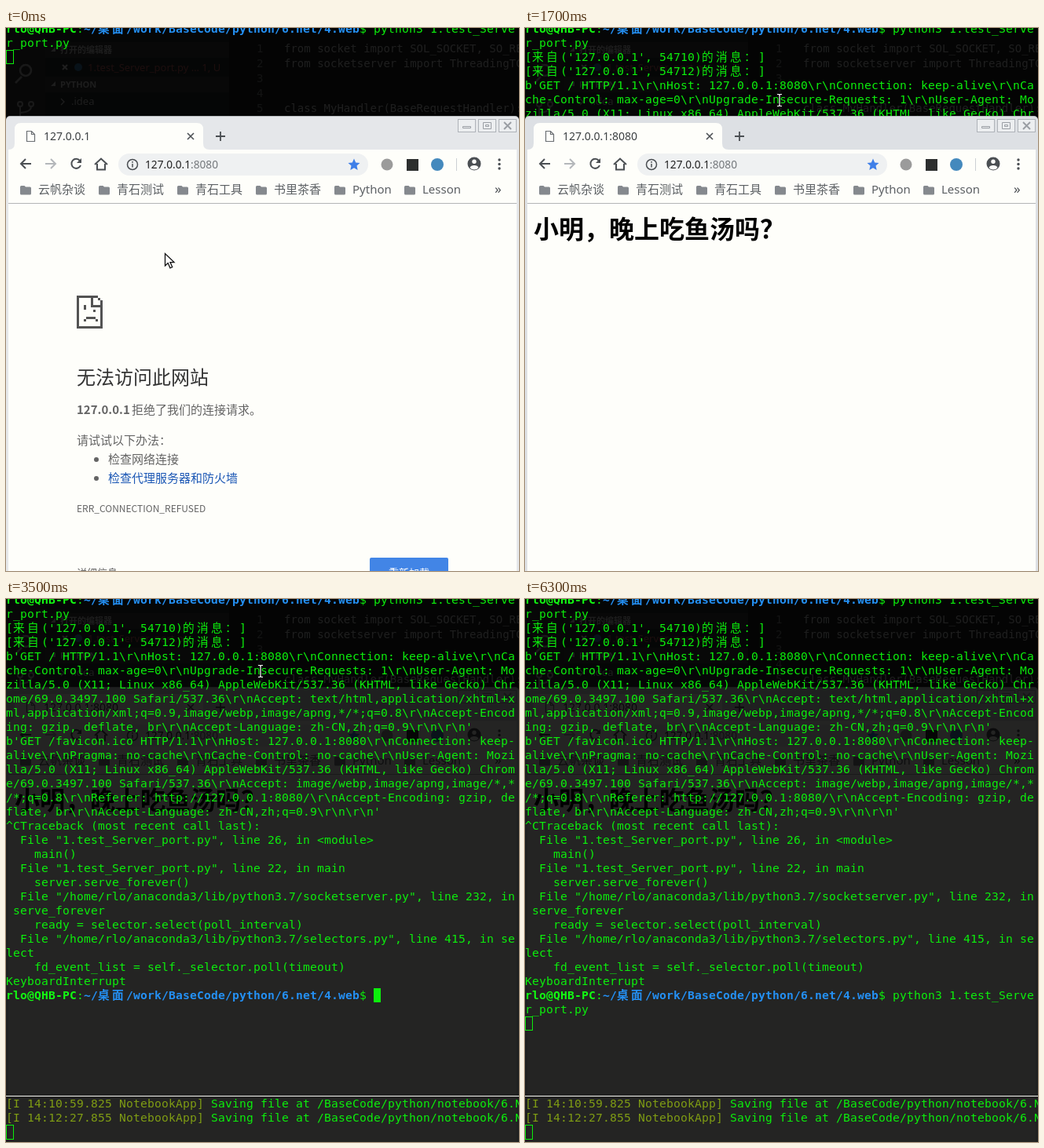
An HTML page with a canvas that plays this animation: 653x692 px, repeating every 6.4 s.

```html
<!DOCTYPE html>
<html lang="zh-CN">
<head>
<meta charset="utf-8">
<title>Socket server demo</title>
<style>
html, body { margin: 0; width: 653px; height: 692px; overflow: hidden; background: #000; }
canvas { display: block; }
</style>
</head>
<body>
<canvas id="stage" width="653" height="692"></canvas>
<script>
const ctx = document.getElementById('stage').getContext('2d');
const MONO = '"DejaVu Sans Mono", "Noto Sans CJK SC", monospace';
const UI = '"Noto Sans", "Noto Sans CJK SC", sans-serif';
const CJK = '"Noto Sans CJK SC", sans-serif';
const GREEN = '#0cee0c', BRIGHT = '#12fb12', BLUE = '#2490f4', OLIVE = '#7f9c14';
const ICON = '#4b4f53', PAPER = '#fefefa';

function rect(x, y, w, h, color) {
  ctx.fillStyle = color;
  ctx.fillRect(x, y, w, h);
}
function round(x, y, w, h, r, color) {
  ctx.fillStyle = color;
  ctx.beginPath();
  ctx.roundRect(x, y, w, h, r);
  ctx.fill();
}
function frame(x, y, w, h, color) {
  ctx.strokeStyle = color;
  ctx.lineWidth = 1;
  ctx.strokeRect(x + .5, y + .5, w - 1, h - 1);
}
function disc(x, y, r, color) {
  ctx.fillStyle = color;
  ctx.beginPath();
  ctx.arc(x, y, r, 0, 7);
  ctx.fill();
}
function path(d, color, width, x = 0, y = 0, fill) {
  const p = new Path2D(d);
  ctx.save();
  ctx.translate(x, y);
  if (fill) { ctx.fillStyle = fill; ctx.fill(p); }
  ctx.strokeStyle = color;
  ctx.lineWidth = width;
  if (width) ctx.stroke(p);
  ctx.restore();
}
function text(s, x, y, font, color) {
  ctx.font = font;
  ctx.fillStyle = color;
  ctx.fillText(s, x, y);
}

// ---- editor behind the terminal ----
function drawEditor() {
  rect(0, 0, 653, 692, '#1b1f1e');
  rect(0, 0, 50, 692, '#333333');
  rect(50, 0, 234, 692, '#252b28');
  rect(50, 18, 234, 20, '#383838');
  rect(50, 62, 234, 20, '#383838');
  path('M20 62L12 70 M32 54a7 7 0 1 1-14 0a7 7 0 1 1 14 0', '#b5b5b5', 2.5);
  path('M21 97a3 3 0 1 1-6 0a3 3 0 1 1 6 0 M35 97a3 3 0 1 1-6 0a3 3 0 1 1 6 0 M18 100v12 M32 100q0 7-14 8', '#b5b5b5', 2);
  path('M57 30h6v-6z M57 74h6v-6z', '', 0, 0, 0, '#ccc');
  path('M70 90l4 4-4 4', '#ccc', 1.3);
  path('M72 47l6 6m0-6l-6 6', '#ddd', 2);
  disc(92, 50, 5, '#3c7eb0');
  text('打开的编辑器', 69, 32, 'bold 11px ' + CJK, '#ccc');
  text('1.test_Server_port.py … 1, U', 104, 55, '13px ' + UI, '#c65f5f');
  text('PYTHON', 69, 76, 'bold 11px ' + UI, '#ccc');
  text('.idea', 83, 98, '13px ' + UI, '#ccc');
  ['from socket import SOL_SOCKET, SO_REUSEADDR', 'from socketserver import ThreadingTCPServer',
    '', '', 'class MyHandler(BaseRequestHandler):'].forEach((line, i) => {
    text(i + 1, 319, 31 + i * 19, '14px ' + MONO, '#858585');
    text(line, 354, 31 + i * 19, '14px ' + MONO, '#d4d4d4');
  });
}

// ---- terminal ----
const USER = 'rlo';
const COMMAND = 'python3 1.test_Server_port.py';
const PROMPT = [[USER + '@QHB-PC', BRIGHT, 1], [':', GREEN], ['~/桌面/work/BaseCode/python/6.net/4.web', BLUE, 1], ['$ ', GREEN]];
const AGENT = 'User-Agent: Mozilla/5.0 (X11; Linux x86_64) AppleWebKit/537.36 (KHTML, like Gecko) Chrome/69.0.3497.100 Safari/537.36';
const REQUESTS = String.raw`[来自('127.0.0.1', 54710)的消息：]
[来自('127.0.0.1', 54712)的消息：]
b'GET / HTTP/1.1\r\nHost: 127.0.0.1:8080\r\nConnection: keep-alive\r\nCache-Control: max-age=0\r\nUpgrade-Insecure-Requests: 1\r\n${AGENT}\r\nAccept: text/html,application/xhtml+xml,application/xml;q=0.9,image/webp,image/apng,*/*;q=0.8\r\nAccept-Encoding: gzip, deflate, br\r\nAccept-Language: zh-CN,zh;q=0.9\r\n\r\n'
b'GET /favicon.ico HTTP/1.1\r\nHost: 127.0.0.1:8080\r\nConnection: keep-alive\r\nPragma: no-cache\r\nCache-Control: no-cache\r\n${AGENT}\r\nAccept: image/webp,image/apng,image/*,*/*;q=0.8\r\nReferer: http://127.0.0.1:8080/\r\nAccept-Encoding: gzip, deflate, br\r\nAccept-Language: zh-CN,zh;q=0.9\r\n\r\n'
`;
const TRACEBACK = `^CTraceback (most recent call last):
  File "1.test_Server_port.py", line 26, in <module>
    main()
  File "1.test_Server_port.py", line 22, in main
    server.serve_forever()
  File "/home/${USER}/anaconda3/lib/python3.7/socketserver.py", line 232, in serve_forever
    ready = selector.select(poll_interval)
  File "/home/${USER}/anaconda3/lib/python3.7/selectors.py", line 415, in select
    fd_event_list = self._selector.poll(timeout)
KeyboardInterrupt
`;

// Writes spans on a 9 x 18 cell grid and returns where the caret ends up.
function write(spans, top, columns) {
  let col = 0, row = 0;
  for (const [s, color, bold] of spans) {
    ctx.font = (bold ? 'bold ' : '') + '11pt ' + MONO;
    ctx.fillStyle = color;
    for (const ch of s) {
      const cells = ch > '\u2e80' ? 2 : 1;
      if (ch === '\n' || col + cells > columns) { col = 0; row++; }
      if (ch === '\n') continue;
      ctx.fillText(ch, col * 9, top + row * 18 + 14);
      col += cells;
    }
  }
  return [col * 9, top + row * 18];
}

const within = (t, a, b) => t >= a && t < b;

function drawTerminal(t) {
  rect(0, 0, 653, 692, 'rgba(0,0,0,.86)');
  const spans = [...PROMPT, [COMMAND + '\n', GREEN]];
  if (t >= 900) spans.push([REQUESTS, GREEN]);
  if (t >= 2700) spans.push([TRACEBACK, GREEN], ...PROMPT);
  if (t >= 4000) spans.push([COMMAND + (t < 4600 ? ' ' : '\n'), GREEN]);
  const [x, y] = write(spans, -8, 72);
  const blinkedOff = within(t, 3300, 3500) || within(t, 4500, 4600) || within(t, 5200, 5800);
  if (t < 1900 || t >= 5800) frame(x, y, 10, 18, GREEN);
  else if (!blinkedOff) rect(x, y, 9, 18, GREEN);

  rect(0, 633, 653, 1, '#f4f4f0');
  const save = ' Saving file at /BaseCode/python/notebook/6.N\n';
  const [px, py] = write([['[I 14:10:59.825 NotebookApp]', OLIVE], [save, GREEN],
    ['[I 14:12:27.855 NotebookApp]', OLIVE], [save, GREEN]], 634, 80);
  frame(px, py, 10, 19, GREEN);
}

// ---- browser ----
function drawBrowser(t) {
  const loaded = t >= 1000, loading = within(t, 900, 1200);
  const bar = t < 300 ? '#e5e7ea' : '#dde0e4';
  round(0, 112, 653, 590, [5, 5, 0, 0], '#b9bcc0');
  round(0, 113, 653, 590, [5, 5, 0, 0], bar);
  rect(3, 155, 647, 537, PAPER);
  path('M3 155q8 0 8-8v-18q0-8 8-8h224q8 0 8 8v18q0 8 8 8z', '', 0, 0, 0, PAPER);

  if (loading) {
    ctx.strokeStyle = '#4285e6';
    ctx.lineWidth = 2;
    ctx.beginPath();
    ctx.arc(31, 138, 5, t / 120, t / 120 + 4);
    ctx.stroke();
  } else path('M26.5 131.5h6l4 4v9h-10z M32.5 131.5v4h4', '#6b6f73', 1.2);
  text(t < 900 ? '127.0.0.1' : '127.0.0.1:8080', 48, 143, '14px ' + UI, '#3c4043');
  path('M231 134l8 8m0-8l-8 8', ICON, 1.6);
  path('M267 138h12m-6-6v12', ICON, 1.8);

  [575, 601, 627].forEach(x => {
    rect(x, 116, 23, 17, '#eceef0');
    frame(x, 116, 23, 17, '#aeb2b8');
  });
  path('M581.5 125.5h10v2h-10z M607.5 120.5h10v8h-10z M610.5 123.5h4v2h-4z', '#9a9ea4', 1);
  path('M634 120l9 9m0-9l-9 9', '#9a9ea4', 2);

  // toolbar
  if (within(t, 800, 1200)) disc(89, 173, 14, '#eceef0');
  path('M32 173H19m6-6l-6 6 6 6', ICON, 2);
  path('M50 173h13m-6-6l6 6-6 6', '#b4b7ba', 2);
  if (loading) path('M84 168l10 10m0-10l-10 10', ICON, 2);
  else {
    path('M94 169a6 6 0 1 0 1 6', ICON, 2);
    path('M96 166v6h-6z', '', 0, 0, 0, ICON);
  }
  path('M113 174l8-7.5 8 7.5 M116 173v7.5h10V173', ICON, 2);
  round(143, 160, 318, 28, 14, '#eff1f2');
  path('M167.5 174a6.5 6.5 0 1 1-13 0a6.5 6.5 0 1 1 13 0 M161 173v4.5 M161 170v1.7', ICON, 1.5);
  text('127.0.0.1', 177, 179, '13.7px ' + UI, '#222');
  const hostWidth = ctx.measureText('127.0.0.1').width;
  text(':8080', 177 + hostWidth, 179, '13.7px ' + UI, '#74787c');
  path('M443 166.5l2.2 5 5.3.5-4 3.6 1.2 5.4-4.7-2.8-4.7 2.8 1.2-5.4-4-3.6 5.3-.5z', '', 0, 0, 0, '#3f7fe8');
  disc(485, 174, 7.5, '#9b9b9b');
  rect(510, 167, 15, 15, '#2c2e2e');
  disc(549, 174, 8, '#4489bd');
  rect(573, 166, 1, 16, '#ccd0d4');
  disc(596, 173, 8.5, ICON);
  disc(596, 170.3, 2.7, PAPER);
  path('M590.5 178q1-3 5.5-3t5.5 3q-2 2.5-5.5 2.5t-5.5-2.5z', '', 0, 0, 0, PAPER);
  [168, 173.5, 179].forEach(y => disc(628, y, 1.7, ICON));

  // bookmarks
  if (within(t, 500, 800)) round(111, 192, 96, 28, 14, '#f2f4f6');
  ['云帆杂谈', '青石测试', '青石工具', '书里茶香', 'Python', 'Lesson'].forEach((name, i) => {
    const x = i < 5 ? 18 + i * 100 : 507;
    path('M1.5 0h4l1.5 1.5h5.5q1.5 0 1.5 1.5v7q0 1.5-1.5 1.5h-11q-1.5 0-1.5-1.5v-8.5q0-1.5 1.5-1.5z', '', 0, x, 201, '#85898e');
    text(name, x + 23, 211, '15px ' + UI, '#5c6064');
  });
  text('»', 622, 211, '17px ' + UI, '#4b4f53');
  rect(3, 223, 647, 1, '#b4b5b6');

  if (loaded) text('小明，晚上吃鱼汤吗？', 11, 268, 'bold 32px ' + CJK, '#000');
  else drawErrorPage();
}

function drawErrorPage() {
  const GREY = '#646464';
  [[0, 0, 9, 1], [0, 0, 1, 14], [0, 13, 11, 1], [10, 2, 1, 12], [9, 1, 1, 1], [6, 0, 1, 4], [6, 4, 5, 1],
    [3, 4, 1, 2], [7, 6, 1, 1], [4, 9, 4, 1], [3, 10, 1, 1], [8, 10, 1, 1]]
    .forEach(([x, y, w, h]) => rect(90 + x * 3, 341 + y * 3, w * 3, h * 3, '#535353'));
  text('无法访问此网站', 90, 454, '24px ' + CJK, '#333');
  text('127.0.0.1', 90, 492, 'bold 15px ' + CJK, GREY);
  text('拒绝了我们的连接请求。', 160, 492, '15px ' + CJK, GREY);
  text('请试试以下办法：', 90, 531, '15px ' + CJK, GREY);
  disc(115, 550, 3, GREY);
  disc(115, 574, 3, GREY);
  text('检查网络连接', 130, 555, '15px ' + CJK, GREY);
  text('检查代理服务器和防火墙', 130, 579, '15px ' + CJK, '#1b57b5');
  text('ERR_CONNECTION_REFUSED', 90, 617, '12px ' + CJK, GREY);
  text('详细信息', 90, 699, '13px ' + CJK, GREY);
  round(463, 675, 100, 32, 2, '#4285e6');
  text('重新加载', 487, 699, '13px ' + CJK, '#fff');
}

// ---- mouse: [time, x, y], held until the next step ----
const MOUSE = [[0, 202, 287], [100, 171, 276], [500, 140, 213], [600, 118, 194], [700, 103, 175],
  [800, 93, 171], [1000, 88, 169], [1200, 96, 166], [1300, 140, 150], [1400, 205, 125],
  [1500, 270, 104], [1600, 310, 95], [1700, 324, 92], [5400, 0, -50], [5800, 126, -11], [6000, 0, -50]];

function drawMouse(t) {
  const [, x, y] = MOUSE.findLast(step => step[0] <= t);
  if (within(t, 1500, 5400)) {
    const beam = 'M-3 -7.5h2l1 1 1-1h2 M0 -6.5v13 M-3 7.5h2l1-1 1 1h2';
    path(beam, '#000', 2.4, x, y);
    path(beam, '#fff', 1.2, x, y);
  } else path('M.5 .5v15.5l3.7-3.4 2.7 6.2 2.8-1.2-2.7-6h5z', '#111', 1.3, x, y, '#fff');
}

function draw(now) {
  const t = Math.floor(now % 6400 / 100) * 100;
  drawEditor();
  if (t < 1900) { drawTerminal(t); drawBrowser(t); }
  else { drawBrowser(t); drawTerminal(t); }
  drawMouse(t);
}

const start = performance.now();
(function tick() {
  draw(performance.now() - start);
  requestAnimationFrame(tick);
})();
</script>
</body>
</html>
```
